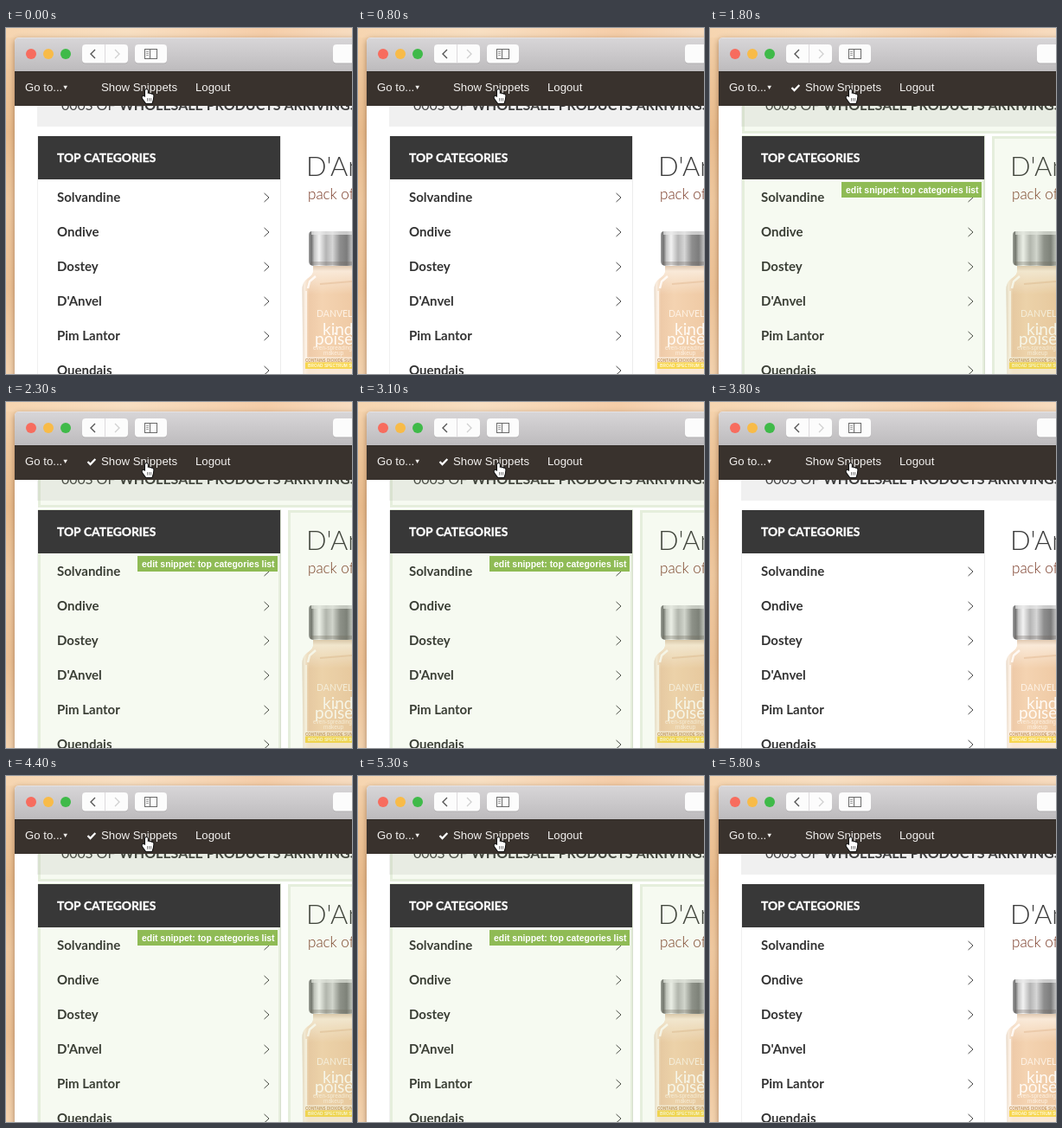
An HTML page with a canvas for the animation above (6000 ms loop, 400 px wide and 400 px high).

```html
<!DOCTYPE html>
<html lang="en">
<head>
<meta charset="utf-8">
<title>Show snippets</title>
<style>
html, body { margin: 0; width: 100%; height: 100%; overflow: hidden; background: #fff; }
canvas { display: block; width: 400px; height: 400px; }
</style>
</head>
<body>
<canvas id="stage"></canvas>
<script>
const LOOP = 6000;
const SHOWN = [[1800, 3200], [4400, 5800]];
const LATO = 'Lato, sans-serif';
const SANS = '"Liberation Sans", Arial, sans-serif';
const BRANDS = ['Solvandine', 'Ondive', 'Dostey', "D'Anvel", 'Pim Lantor', 'Quendais'];

const canvas = document.getElementById('stage');
const ctx = canvas.getContext('2d');
const ratio = window.devicePixelRatio || 1;
canvas.width = canvas.height = 400 * ratio;

function rect(x, y, w, h, fill) {
  ctx.fillStyle = fill;
  ctx.fillRect(x, y, w, h);
}

function round(x, y, w, h, r, fill) {
  ctx.beginPath();
  ctx.roundRect(x, y, w, h, r);
  ctx.fillStyle = fill;
  ctx.fill();
}

function line(points, color, width) {
  ctx.beginPath();
  points.forEach(([x, y]) => ctx.lineTo(x, y));
  ctx.strokeStyle = color;
  ctx.lineWidth = width;
  ctx.stroke();
}

function text(str, x, y, font, color) {
  ctx.font = font;
  ctx.fillStyle = color;
  ctx.fillText(str, x, y);
}

function gradient(x0, y0, x1, y1, ...stops) {
  const g = ctx.createLinearGradient(x0, y0, x1, y1);
  stops.forEach(([at, color]) => g.addColorStop(at, color));
  return g;
}

function drawDesktop() {
  rect(0, 0, 400, 400, gradient(0, 0, 0, 400,
    [0, '#f6d5b0'], [0.12, '#efc79c'], [0.3, '#e9bb8c'],
    [0.5, '#efc89f'], [0.75, '#ecc094'], [1, '#f3d2ae']));
  rect(0, 0, 400, 11, gradient(0, 0, 400, 0,
    [0, '#f6d5b0'], [0.35, '#f8dfc2'], [0.75, '#f5cda8'], [1, '#f7dcc0']));
  ctx.save();
  ctx.shadowColor = 'rgba(80,45,15,.45)';
  ctx.shadowBlur = 7 * ratio;
  ctx.shadowOffsetY = 2 * ratio;
  round(10, 11, 410, 420, 5, '#fff');
  ctx.restore();
}

function drawChrome() {
  round(10, 11, 410, 39, [5, 0, 0, 0],
    gradient(0, 11, 0, 50, [0, '#d8d6d8'], [1, '#bdbbbd']));
  rect(14, 11, 386, 1, '#e4e2e4');
  ['#f76c5e', '#f8bb48', '#3fba49'].forEach((fill, i) => {
    ctx.beginPath();
    ctx.arc(29 + 20 * i, 30, 6, 0, 7);
    ctx.fillStyle = fill;
    ctx.fill();
  });
  [[88, 53], [149, 37], [378, 40]].forEach(([x, w]) => {
    round(x, 19.5, w, 22, 4, '#b2b0b2');
    round(x, 19, w, 21.5, 4, '#fcfcfc');
  });
  rect(114, 19, 1, 21.5, '#dcdadc');
  line([[103, 25], [98, 30], [103, 35]], '#555', 1.4);
  line([[126, 25], [131, 30], [126, 35]], '#d0d0d0', 1.3);
  ctx.strokeStyle = '#6a6a6a';
  ctx.lineWidth = 1;
  ctx.strokeRect(160.5, 24.5, 14, 11);
  line([[166.5, 24.5], [166.5, 35.5]], '#6a6a6a', 1);
  [27.5, 29.5, 31.5].forEach(y => line([[162, y], [165, y]], '#999', 0.9));
}

function drawToolbar(on) {
  rect(10, 50, 390, 40, '#39322d');
  rect(10, 50, 390, 1, '#302a26');
  const font = '13.2px ' + SANS;
  text('Go to...', 22, 73, font, '#f3f1ef');
  text('Show Snippets', 110, 73, font, '#f3f1ef');
  text('Logout', 219, 73, font, '#f3f1ef');
  ctx.beginPath();
  ctx.moveTo(66.3, 66.7);
  ctx.lineTo(71, 66.7);
  ctx.lineTo(68.65, 71);
  ctx.fill();
  if (on) line([[94.5, 69], [97.5, 72], [103.3, 66]], '#fff', 2.3);
}

function drawHand() {
  ctx.save();
  ctx.translate(157, 70);
  ctx.beginPath();
  ctx.moveTo(4, 10);
  ctx.lineTo(4, 2);
  ctx.quadraticCurveTo(5.4, 0, 6.8, 2);
  ctx.lineTo(6.8, 6);
  ctx.quadraticCurveTo(8.2, 4.8, 9.2, 6.4);
  ctx.quadraticCurveTo(10.5, 5.4, 11.4, 7);
  ctx.quadraticCurveTo(13, 6.4, 13.4, 8.2);
  ctx.lineTo(12.8, 13);
  ctx.lineTo(11.5, 17);
  ctx.lineTo(5, 17);
  ctx.lineTo(1, 11.5);
  ctx.quadraticCurveTo(0, 9, 2, 8.8);
  ctx.closePath();
  // outline first, so that the white keeps its full size
  ctx.strokeStyle = '#111';
  ctx.lineWidth = 2;
  ctx.stroke();
  ctx.fillStyle = '#fff';
  ctx.fill();
  [6.5, 8.6, 10.6].forEach(x => line([[x, 11], [x, 14.5]], '#444', 0.7));
  ctx.restore();
}

function drawBanner() {
  rect(36, 90, 364, 24, '#f0f0f0');
  text('000S OF', 64, 95, '16px ' + LATO, '#444');
  text('WHOLESALE PRODUCTS ARRIVINGS', 131, 95, 'bold 16px ' + LATO, '#3c3c3c');
}

function drawCategories() {
  rect(36, 125, 1, 275, '#f0f0f0');
  rect(317, 125, 1, 275, '#ececec');
  BRANDS.forEach((name, i) => {
    const y = 196 + 40 * i;
    text(name, 59, y + 5, 'bold 15px ' + LATO, '#333');
    line([[298.5, y - 5], [304, y], [298.5, y + 5]], '#444', 1);
  });
}

function drawBottle() {
  // glass shoulders and body
  ctx.beginPath();
  ctx.moveTo(355, 272);
  ctx.lineTo(355, 282);
  ctx.bezierCurveTo(354, 290, 343, 288, 342.5, 302);
  ctx.lineTo(343.5, 400);
  ctx.lineTo(400, 400);
  ctx.lineTo(400, 272);
  ctx.closePath();
  ctx.fillStyle = gradient(342, 0, 400, 0,
    [0, '#dcc8b2'], [0.05, '#f9eee2'], [0.14, '#eecaa8'], [0.4, '#f4d3b1'], [1, '#efcaa5']);
  ctx.fill();
  ctx.save();
  ctx.clip();
  rect(342, 272, 58, 36, gradient(0, 272, 0, 308,
    [0, 'rgba(205,180,155,.8)'], [0.25, 'rgba(250,236,221,.9)'], [1, 'rgba(250,236,221,0)']));
  ctx.restore();
  line([[347, 304], [347, 382]], 'rgba(255,250,243,.75)', 2);
  line([[358, 287], [351, 293], [349, 301]], 'rgba(255,252,248,.9)', 2.5);
  line([[363, 296], [400, 293]], 'rgba(226,186,148,.5)', 2);

  // metal cap
  round(350, 235, 60, 40, [4, 0, 0, 5], gradient(350, 0, 400, 0,
    [0, '#a0a0a0'], [0.06, '#6e6e6e'], [0.13, '#c4c4c4'], [0.24, '#f3f3f3'],
    [0.4, '#b4b4b4'], [0.55, '#d6d6d6'], [0.72, '#8e8e8e'], [0.88, '#7c7c7c'], [1, '#c0c0c0']));
  rect(353, 235, 47, 4, 'rgba(232,232,232,.7)');
  rect(352, 270, 48, 4, 'rgba(110,100,92,.3)');

  text('DANVEL', 359, 334, '10.5px ' + LATO, '#fdf1e4');
  text('kind', 366, 355, '19px ' + LATO, '#fffaf4');
  text('poise', 357, 365.5, '19px ' + LATO, '#fffaf4');
  text('even-spreading', 355, 371.5, '6.5px ' + SANS, '#fdf0e1');
  text('makeup', 367, 378, '6.5px ' + SANS, '#fdf0e1');
  rect(345, 380.5, 55, 6, 'rgba(253,244,232,.7)');
  text('CONTAINS DIOXIDE SUN', 346, 385.5, 'bold 4.6px ' + SANS, '#c79a66');
  rect(346, 386.5, 54, 7.5, '#f7d650');
  text('BROAD SPECTRUM SUN', 349, 392, 'bold 4.8px ' + SANS, '#fff8d8');
  rect(345, 394, 55, 6, 'rgba(252,240,226,.75)');
}

function drawProduct() {
  text("D'Anvel", 347, 171, '300 31px ' + LATO, '#3c3c3c');
  text('pack of', 349, 198, '300 17px ' + LATO, '#75331f');
  drawBottle();
}

function drawSnippet(x, y, w, h) {
  rect(x, y, w, h, 'rgba(143,187,80,.08)');
  ctx.strokeStyle = 'rgba(130,165,90,.14)';
  ctx.lineWidth = 3;
  ctx.strokeRect(x + 1.5, y + 1.5, w - 3, h - 3);
}

function drawSnippets() {
  drawSnippet(37, 80, 370, 42);
  drawSnippet(37, 124, 281, 290);
  drawSnippet(326, 125, 90, 290);
}

function drawHeader() {
  rect(37, 125, 280, 50, '#383838');
  text('TOP CATEGORIES', 59, 155, 'bold 13.8px ' + LATO, '#fff');
  ctx.strokeStyle = '#fff';
  ctx.lineWidth = 0.35;
  ctx.strokeText('TOP CATEGORIES', 59, 155);
}

function drawTag() {
  rect(152, 178, 162, 18, '#8fbb55');
  text('edit snippet: top categories list', 157, 191, 'bold 10.4px ' + SANS, '#fff');
}

function draw(t) {
  const on = SHOWN.some(([from, to]) => t >= from && t < to);
  ctx.setTransform(ratio, 0, 0, ratio, 0, 0);
  drawDesktop();
  drawBanner();
  drawCategories();
  drawProduct();
  if (on) drawSnippets();
  drawHeader();
  if (on) drawTag();
  drawChrome();
  drawToolbar(on);
  drawHand();
}

const start = performance.now();
function tick() {
  draw((performance.now() - start) % LOOP);
  requestAnimationFrame(tick);
}
tick();
</script>
</body>
</html>
```
